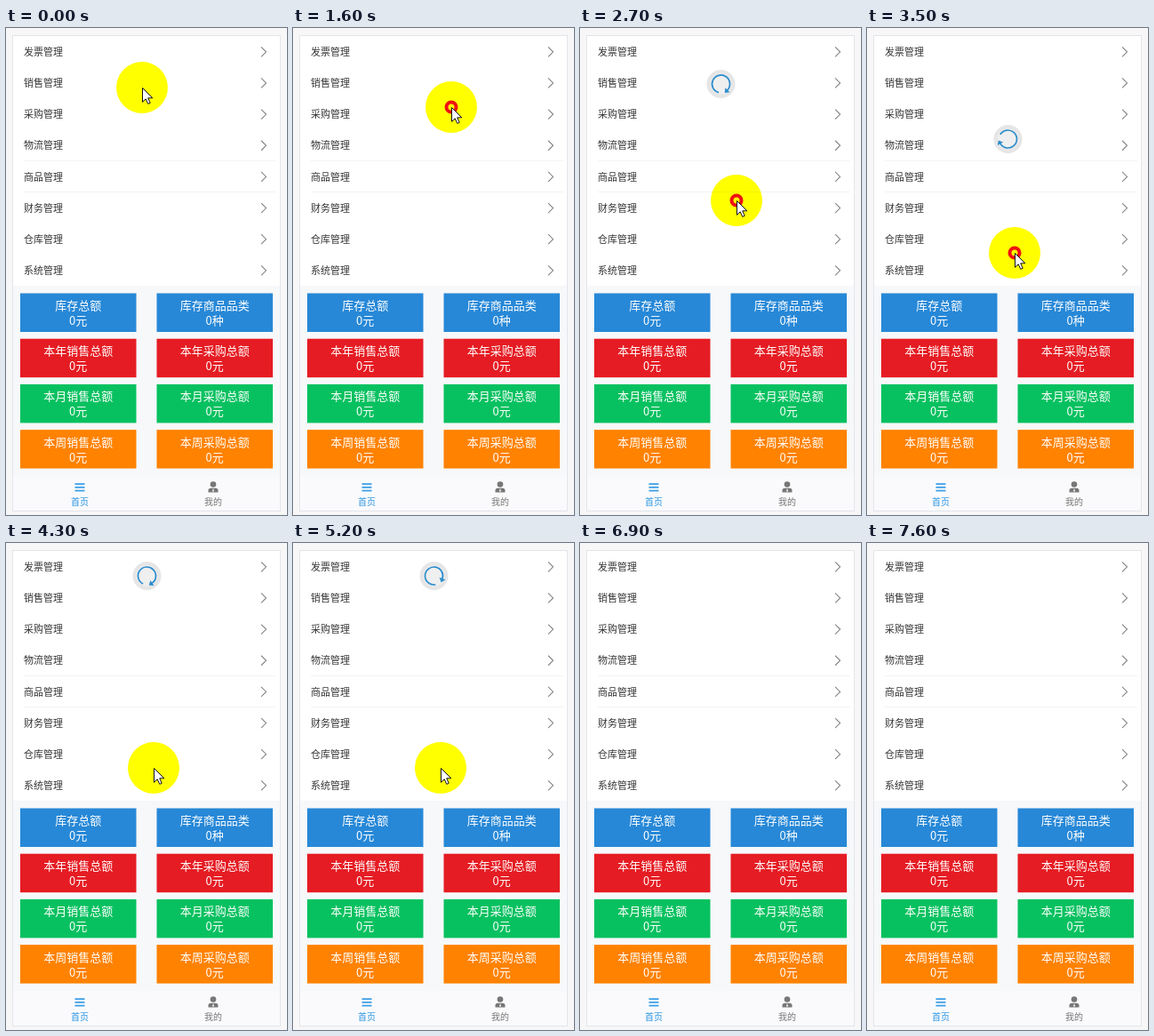
Animation of 316 by 548 pixels, one loop 8200 ms. Source, as an HTML page:

```html
<!DOCTYPE html>
<html lang="zh-CN">
<head>
<meta charset="utf-8">
<style>
  html, body { margin: 0; width: 100%; height: 100%; overflow: hidden; background: #f7f7f8; }
  svg { display: block; font-family: "Noto Sans CJK SC", "Noto Sans CJK", "Noto Sans", sans-serif; }
  .menu { font-size: 11px; fill: #333; }
  .chevron { fill: none; stroke: #858585; stroke-width: 1.1; }
  .tile { font-size: 13px; fill: #fff; text-anchor: middle; }
  .tab { font-size: 10px; text-anchor: middle; }
  #halo { mix-blend-mode: multiply; }
</style>
</head>
<body>
<svg width="316" height="548" viewBox="0 0 316 548">
  <rect width="316" height="548" fill="#f7f7f8"/>
  <rect x="7.5" y="8.5" width="301" height="535" fill="#f7f8fa" stroke="#e4e5ec"/>
  <rect x="8" y="9" width="300" height="281" fill="#fff"/>
  <path d="M20 149.5H304M20 184.5H304" stroke="#f3f3f3"/>
  <g id="menu"></g>
  <g id="tiles"></g>
  <rect x="8" y="504" width="300" height="39" fill="#fafafc"/>
  <path d="M77.5 513.2H88.5M77.5 516.9H88.5M77.5 520.6H88.5" stroke="#3d9fe6" stroke-width="1.7"/>
  <text class="tab" x="83" y="536.7" fill="#2492e2">首页</text>
  <g fill="#777">
    <circle cx="233" cy="513.5" r="3.3"/>
    <path d="M227.5 522.5v-2q0-2.7 3-2.7h5q3 0 3 2.7v2z"/>
    <text class="tab" x="233" y="536.7">我的</text>
  </g>
  <path d="M233 518l-1 3 1 1 1-1z" fill="#fafafc"/>

  <g id="spinner">
    <circle r="16" fill="#e6e6e7"/>
    <circle r="11.5" fill="#efeff0"/>
    <g id="arc">
      <path d="M5 8.66A10 10 0 1 1 10 0" fill="none" stroke="#2b8ccb" stroke-width="1.7"/>
      <path d="M6.4-.4h7.2L10 4z" fill="#2b8ccb"/>
    </g>
  </g>
  <g id="pointer">
    <circle id="halo" r="29" fill="#ff0"/>
    <circle id="press" r="5.5" fill="none" stroke="#f01010" stroke-width="4"/>
    <path d="M.5.5V16.3L4.2 12.8 6.8 18.4 9.2 17.3 6.7 11.8H11.8Z" fill="#fff" stroke="#111"/>
  </g>
</svg>
<script>
const LOOP = 8200, STEP = 100;
const $ = id => document.getElementById(id);

$('menu').innerHTML = ['发票', '销售', '采购', '物流', '商品', '财务', '仓库', '系统'].map((name, i) => {
  const y = 26.8 + i * 35.15;
  return `<text class="menu" x="20" y="${y + 4.2}">${name}管理</text>
    <path class="chevron" d="M287 ${y - 5.5}l5.5 5.5-5.5 5.5"/>`;
}).join('');

const rows = [
  ['#2788d7', '库存总额', '库存商品品类'],
  ['#e51c23', '本年销售总额', '本年采购总额'],
  ['#07c160', '本月销售总额', '本月采购总额'],
  ['#ff8200', '本周销售总额', '本周采购总额']
];
$('tiles').innerHTML = rows.map(([color, ...titles], r) => titles.map((title, c) => {
  const x = 16 + c * 153.5, y = 298.5 + r * 51.2;
  const unit = title.endsWith('品类') ? '种' : '元';
  return `<rect x="${x}" y="${y}" width="130.5" height="43.5" fill="${color}"/>
    <text class="tile" x="${x + 65.2}" y="${y + 18.4}">${title}</text>
    <text class="tile" x="${x + 65.2}" y="${y + 35.4}">0${unit}</text>`;
}).join('')).join('');

// Linear interpolation through [time, ...values] stops
function track(stops, t) {
  const next = stops.findIndex(s => s[0] > t);
  if (next < 0) return stops[stops.length - 1].slice(1);
  if (next === 0) return stops[0].slice(1);
  const a = stops[next - 1], b = stops[next];
  const k = (t - a[0]) / (b[0] - a[0]);
  return a.slice(1).map((v, i) => v + (b[i + 1] - v) * k);
}

const pointerPath = [
  [0, 153, 67], [700, 178, 89], [1900, 178, 89], [2100, 178, 98], [2400, 177, 145],
  [2700, 176, 194], [3000, 169, 237], [3300, 166, 253], [5800, 166, 253],
  [6000, 193, 235], [6300, 304, 159], [6500, 335, 145], [6700, 350, 140]
];
const RELEASE = 3700, SETTLED = 4000, DONE = 5200;
// [time, centre y, arc angle, scale]
const refreshPath = [
  [RELEASE, 125, 150, 1], [SETTLED, 37, 308, 1], [DONE, 37, 740, 1], [5400, 37, 740, 0]
];

function spinnerAt(t, pointerY) {
  if (t >= RELEASE) return track(refreshPath, t);
  const y = 63 + (pointerY - 194) * 62 / 59;
  return [y, 45 + (y - 63) * 1.7, t >= 1600 ? 1 : 0];
}

function draw(t) {
  const [x, y] = track(pointerPath, t);
  $('pointer').setAttribute('transform', `translate(${x} ${y})`);
  $('press').style.display = t >= 1600 && t < RELEASE ? '' : 'none';

  const [cy, angle, scale] = spinnerAt(t, y);
  $('spinner').style.display = scale > 0 ? '' : 'none';
  $('spinner').setAttribute('transform', `translate(158.5 ${cy}) scale(${scale})`);
  $('arc').setAttribute('transform', `rotate(${angle})`);
}

let start;
function tick(now) {
  start ??= now;
  const t = (now - start) % LOOP;
  draw(Math.floor((t + 0.5) / STEP) * STEP % LOOP);
  requestAnimationFrame(tick);
}
draw(0);
requestAnimationFrame(tick);
</script>
</body>
</html>
```
